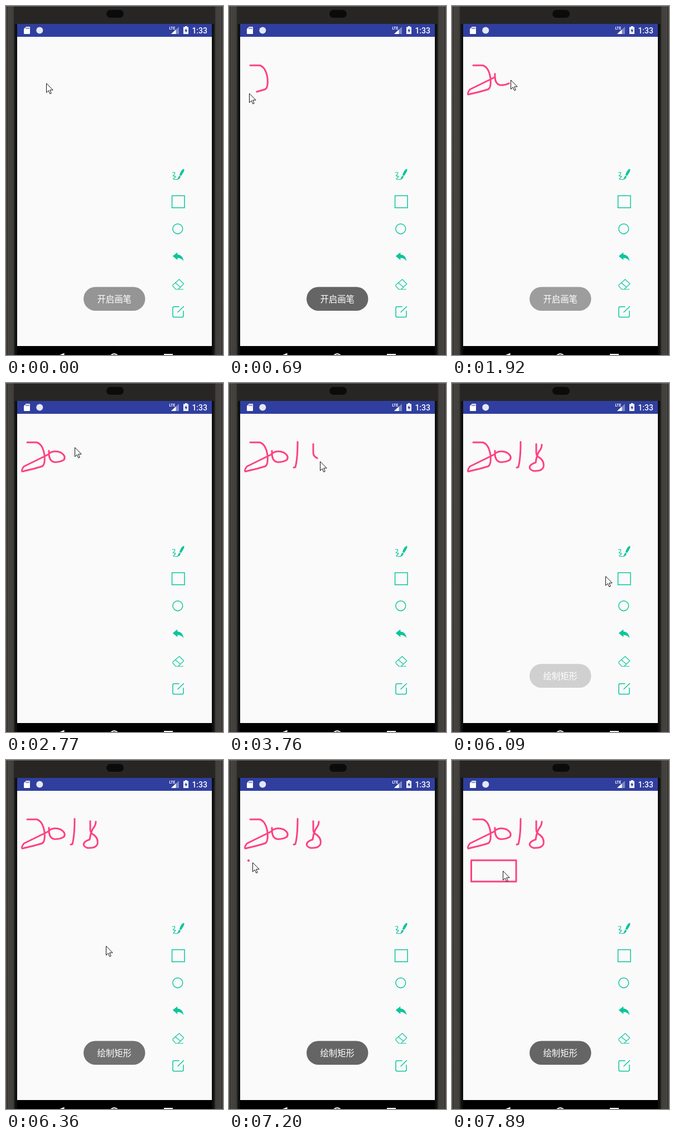
An HTML page with a canvas for the animation above (8 s loop, 389 by 623 pixels).

```html
<!DOCTYPE html>
<html lang="zh-CN">
<head>
<meta charset="utf-8">
<title>画板</title>
<style>
html, body { margin: 0; width: 100%; height: 100%; overflow: hidden; background: #0d0d0d; }
canvas { display: block; width: 389px; height: 623px; }
svg { position: absolute; width: 0; height: 0; }
</style>
</head>
<body>
<canvas id="stage"></canvas>
<!-- Handwriting; from and to count screen refreshes -->
<svg>
  <path data-from="1.5" data-to="8.5" d="M38 106H55Q66 109 69 129Q70.500 147 64 149L50 153L29 158Q27 156 32 149L77 127"/>
  <path data-from="10.8" data-to="17.2" d="M77 121Q76 139 86 141Q96 142 104 137Q108 130 98 124Q86 119 77 126"/>
  <path data-from="20" data-to="23" d="M123 105Q123 135 119 150L116 151"/>
  <path data-from="25" data-to="34" d="M151 109V124Q151 131 158 134Q166 141 164 150Q161 158 146 157Q137 154 140 148Q143 144 150 142Q152 127 157 121Q161 116 161 110"/>
</svg>
<script>
const W = 389, H = 623, LOOP = 8000;
const REFRESH = 138.5, OFFSET = 34;
const LEAD = 0.6;        // refreshes by which the pointer runs ahead of the ink
const FADE = 3.6;        // refreshes a toast takes to fade
const GREEN = '#0cc59b', PINK = '#ff4081';

const canvas = document.getElementById('stage');
const ctx = canvas.getContext('2d');
const dpr = window.devicePixelRatio || 1;
canvas.width = W * dpr;
canvas.height = H * dpr;

const strokes = [...document.querySelectorAll('svg path')].map(el => ({
  el,
  path: new Path2D(el.getAttribute('d')),
  length: el.getTotalLength(),
  from: +el.dataset.from,
  to: +el.dataset.to
}));

const box = { x: 34.5, y: 179, from: 51 };

const toasts = [
  { text: '开启画笔', start: -1.55, end: 11.8 },
  { text: '绘制矩形', start: 43.45, end: 99 }
];

const clamp = v => Math.max(0, Math.min(1, v));
const lerp = (a, b, k) => a + (b - a) * k;
const smooth = k => k * k * (3 - 2 * k);
const progress = (s, n) => clamp((n - s.from) / (s.to - s.from));

function tip(s, n) {
  const { x, y } = s.el.getPointAtLength(s.length * progress(s, n));
  return [x, y];
}

// Where the pointer rests or turns between strokes: refresh, x, y
const stops = [
  [0, 72, 138], [18, 124, 107], [38, 319, 350], [40, 319, 350], [42, 309, 350], [43, 309, 350],
  [46, 179, 332], [49, 26, 113], [box.from, 34, 179], [56, 115, 217], [57, 91, 198]
];
for (const s of strokes) {
  stops.push([s.from - LEAD, ...tip(s, s.from)], [s.to - LEAD, ...tip(s, s.to)]);
}
stops.sort((a, b) => a[0] - b[0]);

function pointerAt(n) {
  const ahead = n + LEAD;
  const active = strokes.find(s => ahead >= s.from && ahead <= s.to);
  if (active) return tip(active, ahead);
  const next = stops.findIndex(s => s[0] > n);
  if (next < 0) return stops.at(-1).slice(1);
  const [n0, x0, y0] = stops[next - 1], [n1, x1, y1] = stops[next];
  const k = smooth((n - n0) / (n1 - n0));
  return [lerp(x0, x1, k), lerp(y0, y1, k)];
}

function rect(x, y, w, h, color) {
  ctx.fillStyle = color;
  ctx.fillRect(x, y, w, h);
}

function fillPath(d, color) {
  ctx.fillStyle = color;
  ctx.fill(new Path2D(d));
}

function strokePath(d, color, width) {
  ctx.strokeStyle = color;
  ctx.lineWidth = width;
  ctx.stroke(new Path2D(d));
}

function circle(x, y, r) {
  ctx.beginPath();
  ctx.arc(x, y, r, 0, Math.PI * 2);
}

function pill(x, y, w, h, color) {
  ctx.fillStyle = color;
  ctx.beginPath();
  ctx.roundRect(x, y, w, h, h / 2);
  ctx.fill();
}

function label(text, x, y, font, align) {
  ctx.font = font;
  ctx.textAlign = align;
  ctx.fillStyle = '#fff';
  ctx.fillText(text, x, y);
}

function side() {
  const g = ctx.createLinearGradient(0, 0, 20, 0);
  g.addColorStop(0, '#5a5651');
  g.addColorStop(0.14, '#2b2927');
  g.addColorStop(0.3, '#454340');
  g.addColorStop(0.65, '#413f3c');
  g.addColorStop(0.82, '#121211');
  g.addColorStop(1, '#0c0c0c');
  rect(0, 0, 20, H, g);
  rect(3.5, 0, 1, H, '#5c5955');
}

function phone() {
  rect(0, 0, W, H, '#272624');
  side();
  ctx.save();
  ctx.translate(W, 0);
  ctx.scale(-1, 1);
  side();
  ctx.restore();
  rect(15, 0, 359, 32, '#272624');
  rect(0, 0, W, 1, '#6b6966');
  pill(180, 7, 31, 14, '#0b0b0b');
  rect(20, 32, 349, 23, '#303f9f');
  rect(20, 55, 349, 552, '#fafafa');
  rect(20, 607, 349, 16, '#000');
  // Navigation keys, cut off by the lower edge
  fillPath('M96 623L104.500 619.500V623Z', '#fff');
  circle(194, 629, 8);
  ctx.strokeStyle = '#fff';
  ctx.lineWidth = 2;
  ctx.stroke();
  rect(283, 621, 16, 2, '#fff');
}

function statusBar() {
  fillPath('M36 37H42Q43 37 43 38V49Q43 50 42 50H33Q32 50 32 49V41Z', '#fff');
  for (let i = 0; i < 3; i++) rect(35.5 + i * 2.4, 38.5, 1.2, 2.7, '#303f9f');
  circle(60.3, 43.5, 6);
  ctx.fillStyle = '#e4e7f5';
  ctx.fill();
  fillPath('M310 37V50H296Z', '#7d87c4');
  fillPath('M304.500 42.100V50H296Z', '#fff');
  label('LTE', 292.5, 42.3, 'bold 6.5px "Roboto", sans-serif', 'left');
  rect(318, 37.5, 9, 12.5, '#fff');
  rect(321, 36, 3.5, 2, '#fff');
  fillPath('M323.300 39.500L320 44.700H322.200V48.300L325.300 43.100H323.300Z', '#303f9f');
  label('1:33', 361, 48.7, '500 14px "Roboto", sans-serif', 'right');
}

function tools() {
  ctx.lineCap = ctx.lineJoin = 'round';
  // Brush
  fillPath('M318.500 290.800Q322 292 313.800 303.500L310.800 301.800Q314 292 318.500 290.800Z', GREEN);
  fillPath('M310.300 302.700L313 304.400Q312 309 306.500 310.300Q308.500 307.500 310.300 302.700Z', GREEN);
  strokePath('M298.500 297.500Q305 295 301.500 301Q297 304 302 303.500Q306 303.500 301 307.500Q297 310 307 309.700', GREEN, 1.2);
  // Rectangle and circle
  ctx.lineJoin = 'miter';
  ctx.lineWidth = 1.5;
  ctx.strokeRect(297.6, 338.6, 22.4, 21.6);
  circle(307.8, 397.8, 8.9);
  ctx.stroke();
  ctx.lineJoin = 'round';
  // Undo
  fillPath('M298.800 446.500L307.300 439.800V443.500Q316.500 444 318.500 455.500Q314 449.600 307.300 449.800V453.500Z', GREEN);
  // Eraser
  strokePath('M299 498L310.500 488L318.800 496L308.500 505.800H304.500L299 500ZM303.500 494L312.800 502M304 505.800H317.500', GREEN, 1.1);
  // Edit
  strokePath('M310 536.800H301.500Q299 536.800 299 539.300V553Q299 555.500 301.500 555.500H315.500Q318 555.500 318 553V544.500M308 546.500L318.500 536.500', GREEN, 1.5);
}

function ink(n) {
  ctx.strokeStyle = PINK;
  ctx.lineWidth = 3;
  for (const s of strokes) {
    if (n <= s.from) continue;
    ctx.setLineDash([s.length * progress(s, n) + 0.1, s.length * 2]);
    ctx.stroke(s.path);
  }
  ctx.setLineDash([]);
  if (n > box.from) {
    // The box trails the pointer by one refresh
    const [x, y] = pointerAt(n - 1);
    ctx.strokeRect(box.x, box.y, Math.max(1, x - box.x), Math.max(1, y - box.y));
  }
}

function toast({ text, start, end }, n) {
  const fadeIn = 1 - (1 - clamp((n - start) / FADE)) ** 2;
  const fadeOut = 1 - clamp((n - end) / FADE) ** 2;
  const alpha = fadeIn * fadeOut;
  if (alpha <= 0) return;
  pill(139, 501.5, 110.5, 42.5, `rgba(0, 0, 0, ${0.595 * alpha})`);
  label(text, 194.2, 528.7, '15.4px "Noto Sans CJK SC", "Noto Sans CJK", sans-serif', 'center');
}

function pointer(n) {
  const [x, y] = pointerAt(n);
  ctx.save();
  ctx.translate(Math.round(x) + 0.5, Math.round(y) + 0.5);
  ctx.lineJoin = 'miter';
  const arrow = 'M0 0V16L3.700 12.500L6.300 18.300L8.700 17.300L6.200 11.500H11.300Z';
  fillPath(arrow, '#fff');
  strokePath(arrow, '#101018', 1);
  ctx.restore();
}

function draw(now) {
  const n = Math.floor((now % LOOP + OFFSET) / REFRESH);
  ctx.setTransform(dpr, 0, 0, dpr, 0, 0);
  phone();
  statusBar();
  tools();
  ink(n);
  toasts.forEach(item => toast(item, n));
  pointer(n);
}

let began;
function loop(now) {
  began ??= now;
  draw(Math.max(0, now - began));
  requestAnimationFrame(loop);
}
draw(0);
requestAnimationFrame(loop);
</script>
</body>
</html>
```
